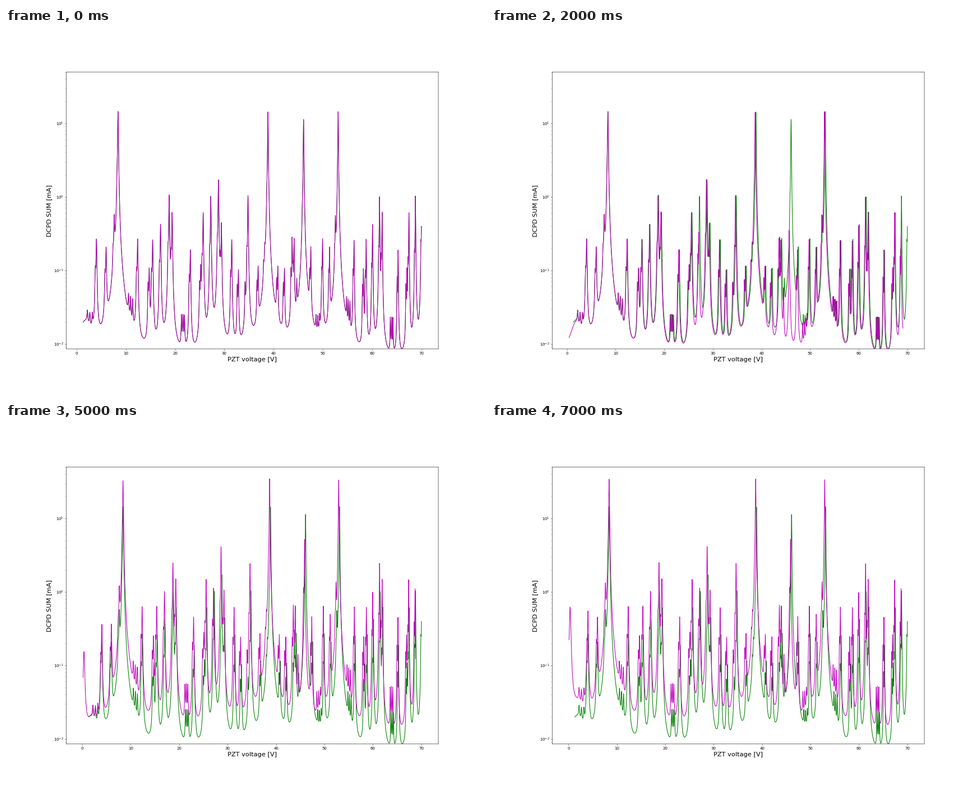
A matplotlib script that plays this animation: 856 by 654 pixels, repeating every 8000 ms.

```python
import numpy as np
import matplotlib.pyplot as plt
from matplotlib.animation import FuncAnimation

W, H, DPI = 856, 654, 64
U = 50.35 / DPI          # size of one layout point at this resolution
SWEEPS = 8
SPAN = 68.67             # length of one voltage sweep
Y_LIM = .00857, 50

plt.rcParams.update({
    "font.family": "DejaVu Sans",
    "font.size": 10 * U,
    "axes.linewidth": 0.8 * U,
    "axes.labelsize": 16.3 * U,
    "lines.linewidth": 1.5 * U,
})
for axis in ("xtick", "ytick"):
    plt.rcParams.update({
        f"{axis}.labelsize": 10 * U,
        f"{axis}.major.size": 3.5 * U, f"{axis}.minor.size": 2 * U,
        f"{axis}.major.width": 0.8 * U, f"{axis}.minor.width": 0.6 * U,
        f"{axis}.major.pad": 3.5 * U, f"{axis}.minor.pad": 3.4 * U,
    })

# Resonance voltages by strength in mA
LEVELS = {
    14.5: [8.42, 38.85],
    11.3: [46.08],
    1.7: [28.8],
    1.03: [18.8, 27.25, 34.8],
    .6: [19.4, 25.7],
    .41: [7.65, 17.05, 29.4],
    .25: [4.04, 12.4, 15.45, 31.5, 43.75, 44.15],
    .18: [6, 23.1, 47.55],
    .09: [14.75, 25.2, 32.85, 36.85, 38.2, 40.85, 42.2],
    .045: [34.2, 44.7],
}
# Groups of three ripples: first voltage, step, strength
RIPPLES = [(2.2, .5, .009), (10.55, .42, .022), (21.3, .3, .015)]


def build_peaks():
    main = np.array([(v, h) for h, volts in LEVELS.items() for v in volts])
    shoulders = np.column_stack([main[:, 0] - .23, .13 * main[:, 1] ** .4])
    shoulders = shoulders[main[:, 1] > .05]
    ripples = [(v + k * step, h) for v, step, h in RIPPLES for k in range(3)]
    peaks = np.vstack([main, shoulders, ripples])

    # the pattern recurs one range later, squeezed by the nonlinear scan
    again = peaks[peaks[:, 0] < 29]
    again[:, 0] += np.interp(again[:, 0], [2.2, 8.42, 18.8, 23.1, 28.8],
                             [46.4, 44.68, 42.7, 42.17, 41.29])
    return np.vstack([peaks, again, (.35, .08)]).T


POS, HEIGHT = build_peaks()
WIDTH = .082 - .0005 * POS + .1 * np.exp(-POS)


def near(volt):
    return np.abs(POS - volt) < .06


def lorentz(x, center, width):
    return width ** 2 / ((x - center) ** 2 + width ** 2)


def spectrum(i):
    """Trace of sweep i: it settles at first, then runs at higher power."""
    high = i >= 5
    start = .13 + 1.2 * np.exp(-.7 * i)
    x = np.linspace(start, start + SPAN, 2800)

    # a second mode family drops out once and is weaker at high power
    weak = .002 if i == 2 else .19 if high else 1
    height = HEIGHT.copy()
    height[near(46.08)] *= weak
    height[near(27.25) | near(68.75)] *= max(.3, weak ** .5)
    height[near(.35)] *= max(1, i - 3) if high else weak

    drift = .19 * (1 - np.exp(-i))
    center = POS - drift * np.sin(np.pi * np.clip((POS - 6) / 75, 0, 1))
    gain = np.interp(x, [2, 9], [.9 + .5 * (i - 5), 2.4]) if high else 1
    floor = .005 + .012 * lorentz(x, 1.8, 1.2)
    peaks = lorentz(x[:, None], center, WIDTH) @ height
    return x, floor * gain ** .5 + peaks * gain


fig = plt.figure(figsize=(W / DPI, H / DPI), dpi=DPI, facecolor="white")
ax = fig.add_axes([107.3 / W, 82.1 / H, 663.7 / W, 493.3 / H])
for spine in ax.spines.values():
    spine.set_snap(False)
ax.set_yscale("log")
ax.set_ylim(Y_LIM)
ax.set_xticks(range(0, 71, 10))
ax.set_xlabel("PZT voltage [V]", labelpad=5 * U)
ax.set_ylabel("DCPD SUM [mA]", labelpad=4 * U)

ax.plot(*spectrum(0), color="g")
trace, = ax.plot([], [], color="m")


def draw(i):
    x, y = spectrum(i)
    trace.set_data(x, y)
    margin = .05 * (70 - x[0])
    ax.set_xlim(x[0] - margin, 70 + margin)
    return trace,


anim = FuncAnimation(fig, draw, frames=SWEEPS, interval=1000,
                     repeat=True, repeat_delay=0, blit=False)
plt.show()
```
